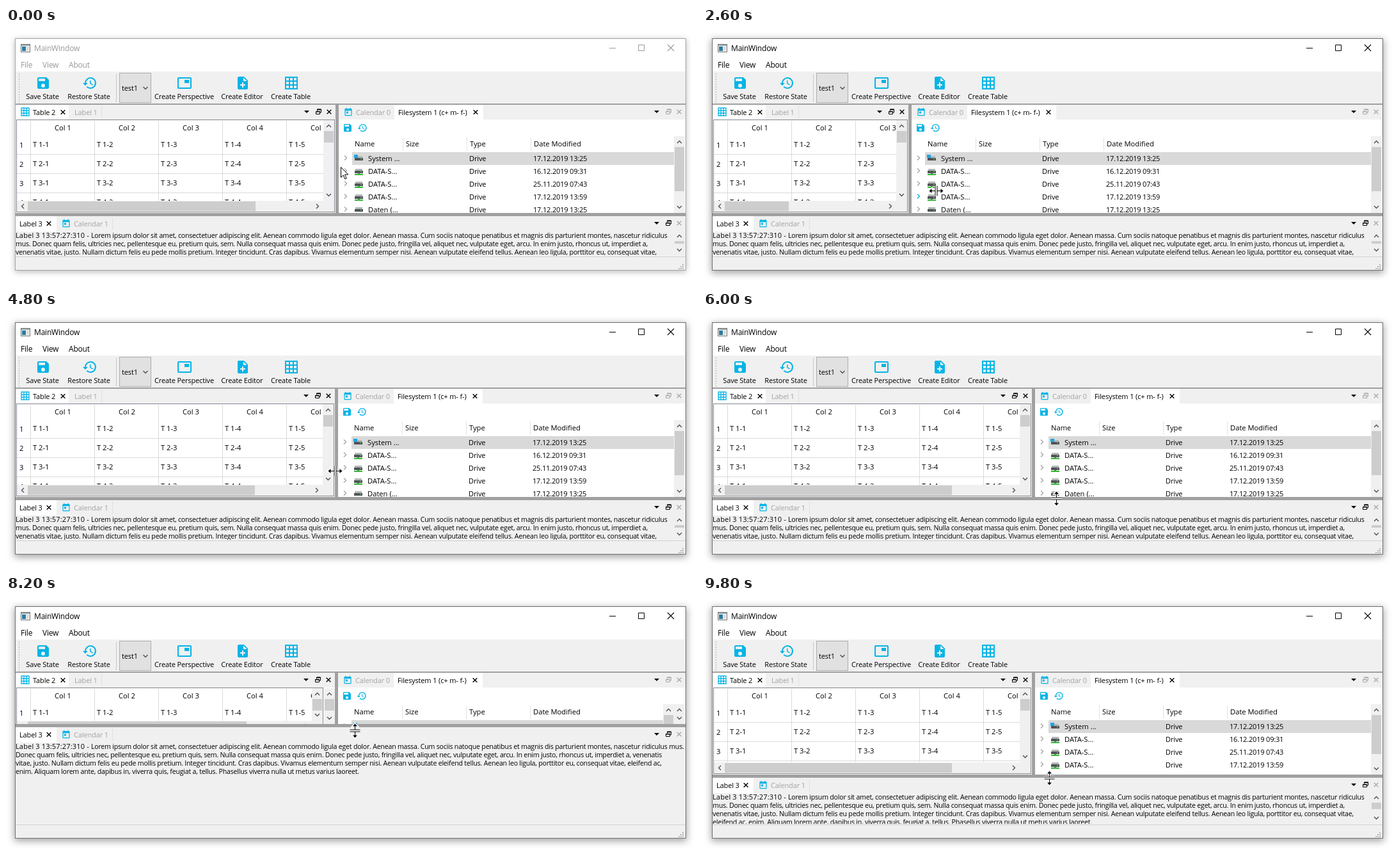
Write an HTML page that moves like this. It is 1080 by 400 pixels and loops after 10000 ms.

```html
<!DOCTYPE html>
<html lang="en">
<head>
<meta charset="utf-8">
<title>Dock layout</title>
<style>
html, body { margin: 0; width: 100%; height: 100%; overflow: hidden; background: #fff; }
#shadow { position: absolute; left: 14px; top: 16px; width: 1049px; height: 363px; }
#stage { position: absolute; left: 0; top: 0; width: 1080px; height: 400px; }
text { font: 11px "Open Sans", "Noto Sans", sans-serif; letter-spacing: -.13px; white-space: pre; }
.ui { font-size: 12px; letter-spacing: -.2px; }
.cell { font-size: 11.2px; letter-spacing: 0; }
.date { letter-spacing: -.18px; }
.stamp { letter-spacing: .16px; }
.prose { font-size: 10.6px; letter-spacing: -.215px; }
rect { shape-rendering: crispEdges; }
</style>
</head>
<body>
<div id="shadow"></div>
<svg id="stage" viewBox="0 0 1080 400"></svg>
<script>
const LOOP = 10000, STEP = 200;
const CYAN = '#05b4e6', INK = '#000', PALE = '#a3a3a3', PANEL = '#f0f0f0', EDGE = '#a0a0a0', GRID = '#dadada';
const stage = document.getElementById('stage');
const shadow = document.getElementById('shadow');

// Motion: [time, value...] keys
const SPLIT_X = [[1200, 515], [1400, 430], [1600, 310], [1800, 256], [2000, 239], [2200, 239], [2400, 252],
  [2800, 390], [3200, 570], [3400, 606], [3800, 680], [4000, 684], [4400, 570], [4600, 515], [4800, 514]];
const SPLIT_Y = [[6800, 289], [7000, 284], [7400, 254], [7800, 202], [8000, 190], [8200, 200],
  [8600, 244], [9000, 270], [9200, 275], [9800, 279]];
const POINTER = [[0, 523, 217], [800, 519, 218], [1000, 517, 218], [1200, 516, 218], [1400, 410, 217], [1600, 290, 216],
  [2000, 241, 222], [2200, 241, 222], [2800, 425, 270], [3200, 600, 256], [3400, 634, 242],
  [3800, 694, 266], [4000, 684, 276], [4400, 550, 256], [4800, 514, 248], [5000, 514, 248],
  [5400, 536, 268], [5800, 550, 300], [6000, 552, 291], [6800, 552, 291], [7400, 552, 240],
  [7800, 549, 194], [8000, 547, 190], [8200, 545, 210], [8600, 543, 254], [9000, 541, 276], [9800, 541, 284]];

function at(keys, t) {
  if (t <= keys[0][0]) return keys[0].slice(1);
  for (let i = 1; i < keys.length; i++) {
    const [a, b] = [keys[i - 1], keys[i]];
    if (t <= b[0]) {
      const k = (t - a[0]) / (b[0] - a[0]);
      return a.slice(1).map((v, j) => Math.round(v + (b[j + 1] - v) * k));
    }
  }
  return keys[keys.length - 1].slice(1);
}

// Drawing helpers
const rect = (x, y, w, h, fill, extra = '') =>
  `<rect x="${x}" y="${y}" width="${Math.max(0, w)}" height="${Math.max(0, h)}" fill="${fill}" ${extra}/>`;
const frame = (x, y, w, h, fill, stroke) => rect(x + .5, y + .5, w - 1, h - 1, fill, `stroke="${stroke}"`);
const text = (x, y, str, cls = '', fill = INK, anchor = 'start') =>
  `<text x="${x}" y="${y}" class="${cls}" fill="${fill}" text-anchor="${anchor}">${str}</text>`;
const line = (d, stroke, width = 1) => `<path d="${d}" fill="none" stroke="${stroke}" stroke-width="${width}"/>`;
const view = (x, y, w, h, body) => w > 0 && h > 0
  ? `<svg x="${x}" y="${y}" width="${w}" height="${h}" viewBox="${x} ${y} ${w} ${h}">${body}</svg>` : '';
const times = (n, fn) => Array.from({ length: n }, (_, i) => fn(i)).join('');

const GLYPH = {
  save: 'M17 3H5a2 2 0 0 0-2 2v14a2 2 0 0 0 2 2h14a2 2 0 0 0 2-2V7zM12 19a3 3 0 1 1 0-6 3 3 0 0 1 0 6zM15 9H5V5h10z',
  history: 'M13 3a9 9 0 0 0-9 9H1l3.900 3.900L9 12H6a7 7 0 1 1 2 4.900l-1.400 1.400A9 9 0 1 0 13 3zM12 8v5l4.300 2.500.7-1.200-3.500-2.100V8z',
  layout: 'M3 3h18a2 2 0 0 1 2 2v14a2 2 0 0 1-2 2H3a2 2 0 0 1-2-2V5a2 2 0 0 1 2-2zM3 5v14h18V5zM12 7h7v5h-7z',
  page: 'M14 2H6a2 2 0 0 0-2 2v16a2 2 0 0 0 2 2h12a2 2 0 0 0 2-2V8zM16 16h-3v3h-2v-3H8v-2h3v-3h2v3h3zM13 9V3.500L18.500 9z',
  grid: 'M2 2h20v20H2z' + times(9, i => `M${4 + i % 3 * 6} ${4 + Math.floor(i / 3) * 6}h4v4h-4z`),
  calendar: 'M19 4h-1V2h-2v2H8V2H6v2H5a2 2 0 0 0-2 2v14a2 2 0 0 0 2 2h14a2 2 0 0 0 2-2V6a2 2 0 0 0-2-2zM19 20H5V9h14zM7 11h5v5H7z',
};
const icon = (name, cx, cy, size) =>
  `<path d="${GLYPH[name]}" fill="${CYAN}" fill-rule="evenodd" transform="translate(${cx - size / 2} ${cy - size / 2}) scale(${size / 24})"/>`;
const cross = (x, y, r, color, width) =>
  line(`M${x - r} ${y - r}l${2 * r} ${2 * r}m0 ${-2 * r}l${-2 * r} ${2 * r}`, color, width);

function dockButtons(x, y, restore, close) {
  return `<path d="M${x - 39} ${y - 2}h8l-4 4z" fill="${INK}"/>`
    + line(`M${x - 18.5} ${y - 1.5}v-2.500h6v5h-2`, restore) + line(`M${x - 18.5} ${y - 3.5}h6`, restore, 1.6)
    + line(`M${x - 20.5} ${y - .5}h6v4h-6z`, restore) + line(`M${x - 20.5} ${y - .3}h6`, restore, 1.6)
    + cross(x, y, 3.3, close, 1.4);
}

// Chevron pointing along dx, dy
const chevron = (x, y, dx, dy, color = '#505050') =>
  line(`M${x - 2 * dx - 3.5 * dy} ${y - 2 * dy - 3.5 * dx}L${x + 1.5 * dx} ${y + 1.5 * dy}L${x - 2 * dx + 3.5 * dy} ${y - 2 * dy + 3.5 * dx}`, color, 1.4);

const vbar = (x, y0, y1, thumb) => rect(x, y0, 17, y1 - y0, PANEL) + rect(x + 1, y0 + 17, 15, thumb, '#cdcdcd')
  + chevron(x + 8.5, y0 + 9, 0, -1) + chevron(x + 8.5, y1 - 9, 0, 1);
const hbar = (x0, x1, y, thumb) => rect(x0, y, x1 - x0, 17, PANEL) + rect(x0 + 17, y + 1, thumb, 15, '#cdcdcd')
  + chevron(x0 + 9, y + 8.5, -1, 0) + chevron(x1 - 9, y + 8.5, 1, 0);

function chrome(active) {
  const ink = active ? INK : '#999';
  const tools = [['save', 58, 57, 'Save State'], ['history', 131, 129.5, 'Restore State'],
    ['layout', 279, 278.5, 'Create Perspective'], ['page', 370, 369, 'Create Editor'], ['grid', 446, 445, 'Create Table']];
  return frame(14, 16, 1049, 363, PANEL, active ? '#6f6f6f' : '#a5a5a5') + rect(15, 17, 1047, 51, '#fff')
    + frame(23, 25, 15, 13, '#f4f4f4', '#777') + rect(24, 26, 13, 2, '#9aa') + rect(25, 29, 6, 7, '#2b7c9d') + rect(32, 29, 4, 7, '#ddd')
    + text(44, 36, 'MainWindow', 'ui', ink)
    + line('M943 31.500h10', ink) + line('M988.500 26.500h9v9h-9z', ink) + cross(1039, 31, 5, ink, 1.1)
    + text(23, 62, 'File', 'ui', ink) + text(57, 62, 'View', 'ui', ink) + text(98, 62, 'About', 'ui', ink)
    + line('M20.500 71v46', '#b4b4b4') + times(12, i => rect(20, 73 + i * 4, 1, 2, PANEL))
    + rect(172, 72, 1, 44, '#c8c8c8') + frame(177, 70, 50, 47, '#e1e1e1', '#adadad')
    + text(181, 98, 'test1') + chevron(218, 94, 0, 1)
    + tools.map(([name, ix, tx, label]) => icon(name, ix, 86, 24) + text(tx, 111, label, '', INK, 'middle')).join('')
    + rect(15, 118, 1047, 2, EDGE) + rect(15, 357, 1047, 1, '#d2d2d2')
    + times(3, r => times(3 - r, i => rect(1057 - i * 3, 375 - r * 3, 2, 2, '#b8b8b8')));
}

function tableDock(s, v) {
  const bottom = Math.max(v, 214), overflow = bottom > v, right = overflow ? s - 17 : s;
  const edge = right - 19, wide = edge - 39 < 500, floor = bottom - (wide ? 19 : 2);
  const cells = times(5, c => text(89 + c * 100, 160, 'Col ' + (c + 1), 'cell', INK, 'middle')
      + rect(138 + c * 100, 145, 1, 150, GRID)
      + times(5, r => text(42 + c * 100, 186 + r * 30, `T ${r + 1}-${c + 1}`, 'cell')))
    + times(5, r => rect(17, 197 + r * 30, 522, 1, GRID) + text(21, 187 + r * 30, r + 1, 'cell'))
    + rect(38, 145, 1, 150, GRID);
  const columns = Math.min(5, Math.floor((edge - 39) / 100));
  const body = rect(15, 143, s - 15, v - 143, '#fff')
    + frame(16, 143, right - 17, bottom - 144, '#fff', '#828790')
    + view(17, 144, edge - 17, floor - 144, cells)
    + rect(edge, floor, 17, bottom - 2 - floor, PANEL)
    + vbar(edge, 144, floor, 18)
    + (wide ? hbar(17, edge, floor, (edge - 51) * columns / 5) : '')
    + (overflow ? vbar(s - 17, 144, v, (v - 178) * (v - 143) / 71) : '');
  const tabs = rect(15, 120, s - 15, 23, PANEL) + rect(15, 120, 83, 23, '#fff')
    + icon('grid', 30, 131, 16) + text(42, 136, 'Table 2') + cross(89, 131.5, 3.3, INK, 1.4)
    + text(107, 136, 'Label 1', '', PALE) + rect(149, 122, 1, 20, '#e0e0e0')
    + dockButtons(s - 10, 131, INK, INK);
  return view(15, 120, s - 15, v - 120, tabs + body);
}

const drive = (x, y, kind) => rect(x - 5, y - 3, 11, 3, '#b4b7b9') + rect(x - 6, y, 13, 4, '#505457') + rect(x + 3, y + 1, 2, 1, '#6fe06f')
  + (kind === 'system' ? rect(x - 7, y - 5, 6, 5, '#1ca5e6') : '')
  + (kind === 'shared' ? rect(x - 1, y + 4, 3, 2, '#4a4') + rect(x - 6, y + 5, 13, 2, '#35b535') : '');

function fileDock(r, v, hover, dragRow) {
  const bottom = Math.max(v, 240), overflow = bottom > v, edge = overflow ? 1027 : 1044;
  const narrow = r + 401 > edge, floor = narrow ? bottom - 17 : bottom;
  const rows = [['System ...', '17.12.2019 13:25', 'system'], ['DATA-S...', '16.12.2019 09:31', 'shared'],
    ['DATA-S...', '25.11.2019 07:43', 'shared'], ['DATA-S...', '17.12.2019 13:59', 'shared'], ['Daten (...', '17.12.2019 13:25', 'local']];
  const list = ['Name', 'Size', 'Type', 'Date Modified'].map((h, i) => text(r + (i ? 5 + i * 100 : 25), 185, h, 'cell')
      + (i ? rect(r + i * 100, 171, 1, 21, '#e2e2e2') : '')).join('')
    + rows.map(([name, date, kind], i) => {
      const y = 203 + i * 20, fill = i === 0 ? '#d9d9d9' : i === hover ? '#e5f3ff' : '';
      return (fill ? rect(r + 21, y - 9, edge - r - 21, 20, fill) : '')
        + chevron(r + 11, y, 1, 0, i === dragRow ? CYAN : '#a6a6a6') + drive(r + 31, y, kind)
        + text(r + 46, y + 5, name, 'cell') + text(r + 204, y + 5, 'Drive') + text(r + 304, y + 5, date, 'date');
    }).join('');
  const shown = Math.min(5, Math.floor((floor - 193) / 20)), track = edge - r - 34;
  const body = rect(r, 143, 1062 - r, v - 143, '#fff') + icon('save', r + 14, 156, 16) + icon('history', r + 37, 156, 16)
    + view(r, 169, edge - r, floor - 169, list)
    + vbar(edge, 169, floor, (floor - 203) * shown / 5)
    + (narrow ? rect(edge, floor, 17, 17, PANEL) + hbar(r, edge, floor, track * (edge - r) / 401) : '')
    + (overflow ? vbar(1044, 169, v, Math.max(0, (v - 203) * (v - 169) / 71)) : '');
  const tabs = rect(r, 120, 1062 - r, 23, PANEL) + icon('calendar', r + 15, 131, 15) + text(r + 27, 136, 'Calendar 0', '', PALE)
    + rect(r + 87, 120, 139, 23, '#fff') + text(r + 93, 136, 'Filesystem 1 (c+ m- f-)') + cross(r + 214, 131.5, 3.3, INK, 1.4)
    + dockButtons(1052, 131, '#aaa', '#aaa');
  return view(r, 120, 1062 - r, v - 120, tabs + body);
}

// "|" breaks the line beside a scroll bar, "/" breaks it at full width
const PROSE = 'Lorem ipsum dolor sit amet, consectetuer adipiscing elit. Aenean commodo ligula eget dolor. Aenean massa. Cum sociis natoque penatibus et magnis dis parturient montes, nascetur ridiculus|mus./Donec quam felis, ultricies nec, pellentesque eu, pretium quis, sem. Nulla consequat massa quis enim. Donec pede justo, fringilla vel, aliquet nec, vulputate eget, arcu. In enim justo, rhoncus ut, imperdiet a,|venenatis/vitae, justo. Nullam dictum felis eu pede mollis pretium. Integer tincidunt. Cras dapibus. Vivamus elementum semper nisi. Aenean vulputate eleifend tellus. Aenean leo ligula, porttitor eu, consequat vitae,|eleifend ac,/enim. Aliquam lorem ante, dapibus in, viverra quis, feugiat a, tellus. Phasellus viverra nulla ut metus varius laoreet.';

function labelDock(v) {
  const top = v + 29, height = 356 - top, scrolls = height < 56;
  const [keep, join] = scrolls ? ['|', '/'] : ['/', '|'];
  const lines = PROSE.replaceAll(join, ' ').split(keep);
  const track = 356 - top - 34;
  const thumb = Math.max(Math.min(9, track), track * height / 65);
  return rect(15, v, 1047, 5, EDGE) + rect(15, v + 5, 1047, 352 - v, PANEL) + rect(15, v + 5, 64, 24, '#fff')
    + text(21, v + 21, 'Label 3') + cross(67, v + 16.5, 3.3, INK, 1.4)
    + icon('calendar', 94, v + 16, 15) + text(106, v + 21, 'Calendar 1', '', PALE) + rect(166, v + 7, 1, 20, '#e0e0e0')
    + dockButtons(1052, v + 16, INK, '#aaa')
    + view(15, v + 28, 1047, 328 - v, text(15, v + 39, 'Label 3 13:57:27:310 - ', 'stamp')
      + lines.map((l, i) => text(i ? 15 : 133, v + 39 + i * 13, l, 'prose')).join(''))
    + (scrolls ? vbar(1044, top - 2, 356, thumb) : '');
}

function pointer(x, y, shape) {
  if (shape === 'arrow') {
    return `<path transform="translate(${x} ${y})" d="M.5.5v16l3.700-3.500 2.600 6 2.400-1-2.600-6h5.200z" fill="#fff" stroke="#000"/>`;
  }
  const bars = 'M-1.500-8v16M1.500-8v16M-1.500 0h-7M1.500 0h7';
  const heads = 'M-11 0l4-3.500v7zM11 0l-4-3.500v7z';
  return `<g transform="translate(${x + .5} ${y + .5}) rotate(${shape === 'rows' ? 90 : 0})">`
    + line(bars + heads, '#fff', 3) + line(bars, '#000') + `<path d="${heads}"/></g>`;
}

function draw(t) {
  const [s] = at(SPLIT_X, t), [v] = at(SPLIT_Y, t), [x, y] = at(POINTER, t);
  const active = t >= 1000;
  const shape = t >= 6000 ? 'rows' : t < 1000 || t > 5000 ? 'arrow' : 'columns';
  const row = Math.floor((y - 194) / 20);
  const hover = shape === 'arrow' && t > 5000 && x > s + 26 && y < v ? row : -1;
  const dragRow = shape === 'columns' && x > s + 10 ? row : -1;
  shadow.style.boxShadow = active ? '0 3px 11px 1px rgba(0,0,0,.36)' : '0 2px 9px rgba(0,0,0,.28)';
  stage.innerHTML = chrome(active) + rect(s, 120, 5, v - 120, EDGE)
    + tableDock(s, v) + fileDock(s + 5, v, hover, dragRow) + labelDock(v) + pointer(x, y, shape);
}

const start = performance.now();
let shown = -1;
function tick() {
  const t = Math.floor((performance.now() - start) % LOOP / STEP) * STEP;
  if (t !== shown) draw(shown = t);
  requestAnimationFrame(tick);
}
tick();
</script>
</body>
</html>
```
